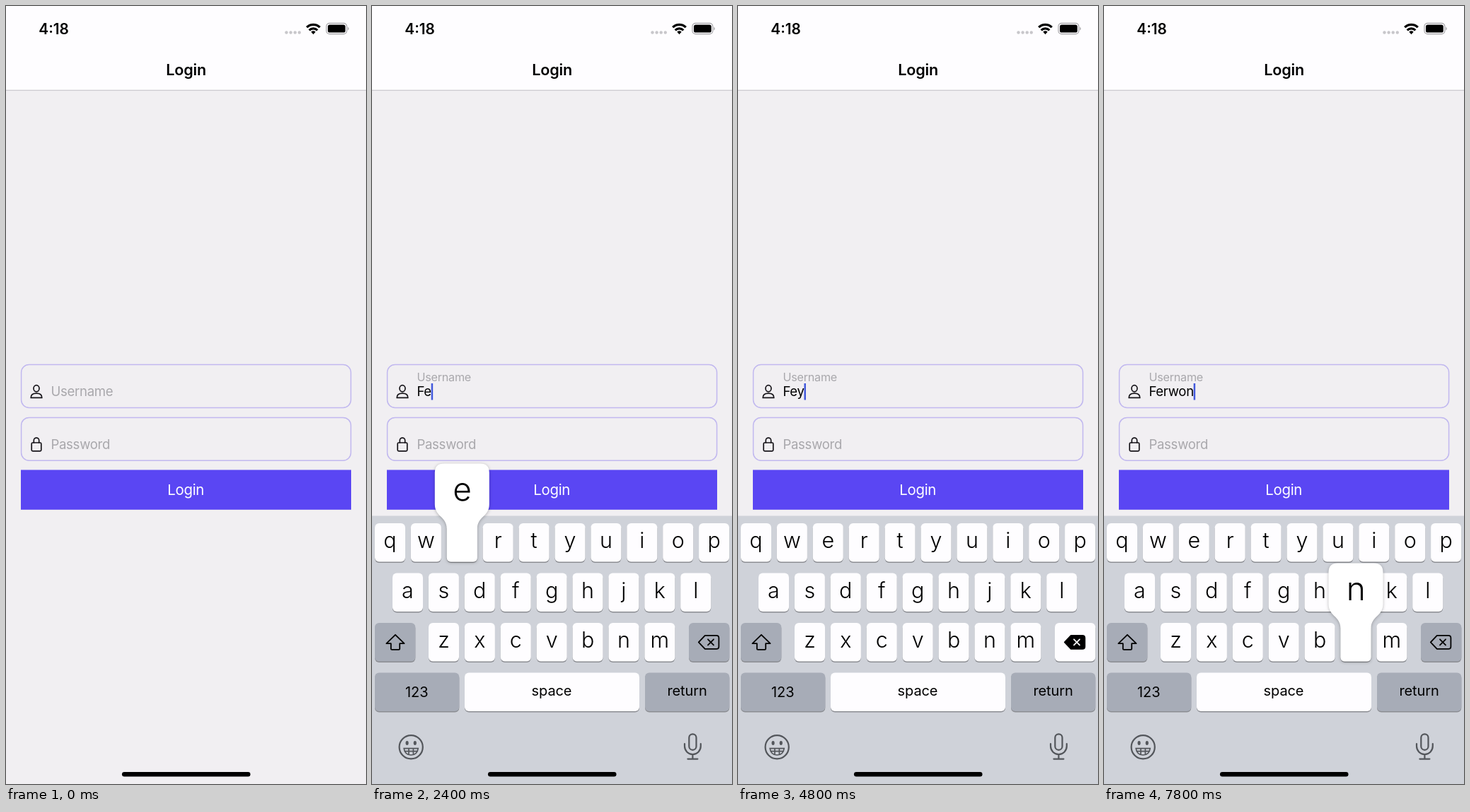
Write an HTML page that moves like this. It is 509 px wide and 1101 px high and loops after 8000 ms.

```html
<!DOCTYPE html>
<html lang="en">
<head>
<meta charset="utf-8">
<title>Login</title>
<style>
  html, body { margin: 0; width: 100%; height: 100%; overflow: hidden; background: #f1eff2; }
  svg { display: block; width: 100%; height: 100%; font-family: Inter, "Liberation Sans", sans-serif; }
  .mid { text-anchor: middle; }
  .field { fill: none; stroke: #c1b8ef; stroke-width: 1.5; }
  .line { fill: none; stroke: #17151a; stroke-width: 1.7; stroke-linecap: round; stroke-linejoin: round; }
  .tool { fill: none; stroke: #53565b; stroke-width: 2.2; stroke-linecap: round; }
  .input { font-size: 18.6px; letter-spacing: -.3px; }
  .hint { fill: #a9a8ac; }
  .upper { font-size: 28px; }
  .lower { font-size: 30.5px; font-weight: 300; }
  .word { font-size: 20px; letter-spacing: -.1px; }
</style>
</head>
<body>
<svg viewBox="0 0 509 1101">
  <rect width="509" height="1101" fill="#f1eff2"/>
  <rect width="509" height="119" fill="#fefdff"/>
  <rect y="118.7" width="509" height="1.2" fill="#c9c8cc"/>

  <text x="46.3" y="40" font-size="20.8" font-weight="600">4:18</text>
  <g fill="#c8c7cb">
    <circle cx="396.5" cy="37.5" r="2.2"/><circle cx="402.6" cy="37.5" r="2.2"/>
    <circle cx="408.7" cy="37.5" r="2.2"/><circle cx="414.8" cy="37.5" r="2.2"/>
  </g>
  <g fill="none" stroke="#000" stroke-width="3.2">
    <path d="M425.2 30.2a13 13 0 0 1 18.6 0M428.7 34.3a8.1 8.1 0 0 1 11.6 0"/>
    <path d="M434.5 40.2l-3.2-3.6a4.8 4.8 0 0 1 6.4 0z" fill="#000" stroke="none"/>
  </g>
  <rect x="453" y="24.4" width="28.8" height="15.2" rx="4.4" fill="none" stroke="#a3a2a6" stroke-width="1.2"/>
  <rect x="455" y="26.4" width="24.8" height="11.2" rx="2.7"/>
  <path d="M483.3 29.4q3 2.6 0 5.2z" fill="#a3a2a6"/>
  <text class="mid" x="254.7" y="98" font-size="21.6" font-weight="600" letter-spacing="-.2">Login</text>

  <rect class="field" x="21.6" y="507.6" width="466" height="60.8" rx="11"/>
  <rect class="field" x="21.6" y="582.4" width="466" height="60.8" rx="11"/>
  <g class="line">
    <ellipse cx="43" cy="541.3" rx="4" ry="4.6"/>
    <path d="M35.2 554.4c0-4.3 2.6-6.2 7.8-6.2s7.8 1.9 7.8 6.2z"/>
    <rect x="36.2" y="618" width="13.6" height="11.8" rx="1.6"/>
    <path d="M39.3 618v-3.2a3.7 3.7 0 0 1 7.4 0v3.2"/>
  </g>
  <text id="label" class="input hint">Username</text>
  <text class="input hint" x="63.4" y="626.6">Password</text>
  <text id="typed" class="input" x="63.4" y="552.4"></text>
  <rect id="caret" y="534" width="2.5" height="23.5" fill="#4259dc"/>
  <rect x="21" y="656.5" width="467" height="56.3" fill="#5a46f3"/>
  <text class="mid" x="254.2" y="692" font-size="20.4" letter-spacing="-.3" fill="#fff">Login</text>

  <g id="board">
    <rect y="721.5" width="509" height="380" fill="#cfd2d9"/>
    <g id="keys"></g>
    <g class="mid word">
      <text x="63.2" y="977.6">123</text>
      <text x="254" y="976">space</text>
      <text x="445.6" y="976">return</text>
    </g>
    <path id="arrow" d="M33 889.8L45.6 902.2H39.2V909.4Q39.2 910.8 37.8 910.8H28.2Q26.8 910.8 26.8 909.4V902.2H20.4Z"
          stroke="#000" stroke-width="1.8" stroke-linejoin="round"/>
    <path id="erase" d="M470.8 890.8H487Q490.4 890.8 490.4 894.2V906.4Q490.4 909.8 487 909.8H470.8L461.8 900.3Z"
          stroke="#000" stroke-width="1.8" stroke-linejoin="round"/>
    <path id="cross" d="M475 896.3l8 8m0-8l-8 8" stroke-width="1.8" stroke-linecap="round"/>
    <g class="tool">
      <circle cx="55.2" cy="1048.8" r="16.6"/>
      <path d="M45.2 1050.6h20c-.6 6-4.6 9.4-10 9.4s-9.4-3.4-10-9.4zM47 1054.6h16.4M52 1051v8M58.4 1051v8" stroke-width="1.7"/>
      <g fill="#53565b" stroke="none">
        <ellipse cx="49.6" cy="1043" rx="2.1" ry="2.9"/><ellipse cx="60.8" cy="1043" rx="2.1" ry="2.9"/>
      </g>
      <rect x="448.3" y="1030.4" width="10.2" height="22.4" rx="5.1"/>
      <path d="M442 1044v3.6a11.4 11.4 0 0 0 22.8 0V1044M453.4 1059.2v6.2M446.4 1065.6h14"/>
    </g>
    <g id="popup">
      <path id="bubble" fill="#fff"/>
      <text id="big" class="mid" font-size="46" font-weight="300"></text>
    </g>
  </g>
  <rect x="164" y="1084" width="181.5" height="6.4" rx="3.2"/>
</svg>
<script>
  const LOOP = 8000, STEP = 200;
  const KEYBOARD_START = 1293, KEYBOARD_HEIGHT = 379.5;
  const ROWS = [
    { letters: 'qwertyuiop', x: 4, y: 732 },
    { letters: 'asdfghjkl', x: 29, y: 802.5 },
    { letters: 'zxcvbnm', x: 80, y: 873 }
  ];
  // Time, typed text, key held down.
  const STEPS = [
    [0, '', ''],
    [2000, 'F', 'F'], [2200, 'F', ''],
    [2400, 'Fe', 'e'], [2600, 'Fe', ''],
    [3600, 'Fey', 'y'], [3800, 'Fey', ''],
    [4800, 'Fey', 'erase'], [5000, 'Fe', ''],
    [5400, 'Fer', 'r'], [5600, 'Fer', ''],
    [6200, 'Ferw', 'w'], [6400, 'Ferw', ''],
    [7000, 'Ferwo', 'o'], [7200, 'Ferwo', ''],
    [7800, 'Ferwon', 'n']
  ];
  const DARK = '#a7acb7', LIGHT = '#fefdff';
  const $ = id => document.getElementById(id);
  const set = (el, attrs) => { for (const k in attrs) el.setAttribute(k, attrs[k]); return el; };
  const add = (parent, tag, attrs) =>
    parent.appendChild(set(document.createElementNS('http://www.w3.org/2000/svg', tag), attrs));

  function key(x, y, width, fill) {
    const box = { x, width, height: 54.6, rx: 6 };
    add($('keys'), 'rect', { ...box, y: y + 1.4, fill: '#8b8d92' });
    return add($('keys'), 'rect', { ...box, y, fill });
  }

  const places = {};
  for (const { letters, x, y } of ROWS) {
    [...letters].forEach((c, i) => {
      const kx = x + i * 50.9;
      key(kx, y, 43, LIGHT);
      places[c] = { x: kx, y };
    });
  }
  const shiftKey = key(4, 873, 57.3, DARK);
  const eraseKey = key(448, 873, 57.3, DARK);
  key(4, 943.5, 119.3, DARK);
  key(131, 943.5, 247, LIGHT);
  key(386, 943.5, 119.3, DARK);

  const upper = add($('keys'), 'g', { class: 'mid upper' });
  const lower = add($('keys'), 'g', { class: 'mid lower' });
  for (const c in places) {
    const { x, y } = places[c];
    add(upper, 'text', { x: x + 21.5, y: y + 38.4 }).textContent = c.toUpperCase();
    add(lower, 'text', { x: x + 21.5, y: y + 35 }).textContent = c;
  }

  function showPopup(c) {
    const place = places[c.toLowerCase()];
    $('popup').style.display = place ? '' : 'none';
    if (!place) return;
    const { x, y } = place;
    set($('bubble'), {
      transform: `translate(${x} ${y})`,
      d: 'M-4-84.5H47Q60-84.5 60-71.5V-27C60-9 43-10 43 8V48.6Q43 54.6 37 54.6H6Q0 54.6 0 48.6V8' +
         'C0-10-17-9-17-27V-71.5Q-17-84.5-4-84.5Z'
    });
    $('bubble').style.filter = 'drop-shadow(0 1px 2px rgba(0,0,0,.28))';
    set($('big'), { x: x + 21.7, y: y - 32 }).textContent = c;
  }

  // Share of the way still to go on a critically damped spring.
  function springLeft(ms) {
    const s = Math.max(0, ms) * .0225;
    return (1 + s) * Math.exp(-s);
  }

  function draw(time) {
    const t = Math.floor(time / STEP) * STEP;
    const [, text, held] = STEPS.filter(s => s[0] <= t).pop();
    const since = t - KEYBOARD_START;

    const left = t >= 1800 ? 0 : springLeft(since);
    set($('board'), { transform: `translate(0 ${left * KEYBOARD_HEIGHT})` });
    const lift = Math.min(1, Math.max(0, since / 152));
    set($('label'), {
      transform: `translate(63.4 ${552 - 20.6 * lift}) scale(${1 - .128 * lift})`
    });

    const caps = t < 2200;
    upper.style.display = caps ? '' : 'none';
    lower.style.display = caps ? 'none' : '';
    set(shiftKey, { fill: caps ? LIGHT : DARK });
    set($('arrow'), { fill: caps ? '#000' : 'none' });

    const erasing = held === 'erase';
    set(eraseKey, { fill: erasing ? LIGHT : DARK });
    set($('erase'), { fill: erasing ? '#000' : 'none' });
    set($('cross'), { stroke: erasing ? '#fff' : '#000' });
    showPopup(held);

    $('typed').textContent = text;
    const end = text ? $('typed').getComputedTextLength() : 0;
    set($('caret'), { x: 64 + Math.max(0, end - .8) });
    $('caret').style.display = since > 0 ? '' : 'none';
  }

  const start = performance.now();
  function tick() {
    draw((performance.now() - start) % LOOP);
    requestAnimationFrame(tick);
  }
  tick();
</script>
</body>
</html>
```
